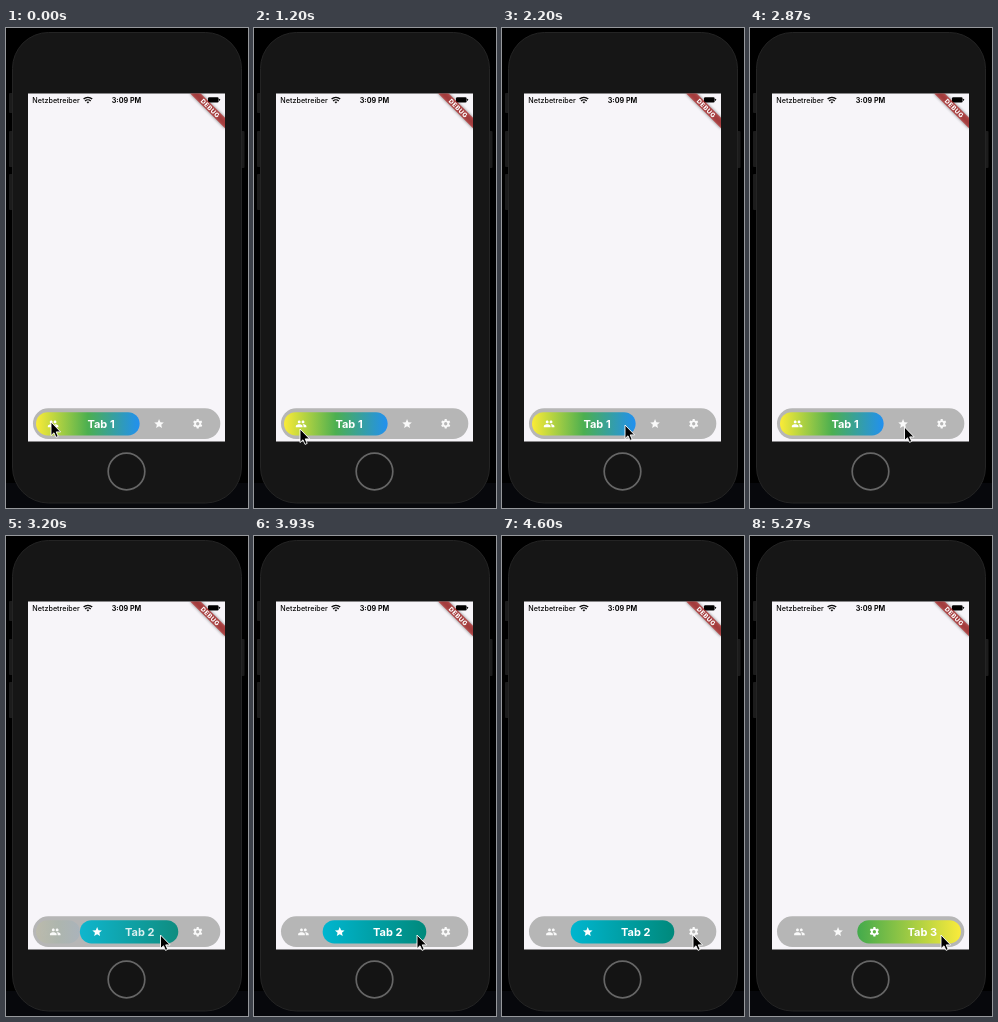
Recreate the animation shown at these times as an HTML page. Size 242 by 480 pixels, loop 5.34 s.

```html
<!DOCTYPE html>
<html lang="en">
<head>
<meta charset="utf-8">
<title>Tab bar</title>
<style>
  html, body { margin: 0; width: 100%; height: 100%; overflow: hidden; background: #000; }
  svg { display: block; width: 242px; height: 480px; }
  text { font-family: Inter, Roboto, sans-serif; text-anchor: middle; }
  .label { font-size: 11px; font-weight: 700; fill: #fff; }
  .status { font-size: 7.2px; fill: #080808; }
  .debug { font-size: 6.3px; font-weight: 800; fill: #fff; letter-spacing: .4px; }
</style>
</head>
<body>
<svg viewBox="0 0 242 480">
  <defs>
    <linearGradient id="g0">
      <stop stop-color="#faeb37"/><stop offset=".5" stop-color="#4caf50"/><stop offset="1" stop-color="#2190f0"/>
    </linearGradient>
    <linearGradient id="g1">
      <stop stop-color="#00b6d0"/><stop offset="1" stop-color="#00897b"/>
    </linearGradient>
    <linearGradient id="g2">
      <stop stop-color="#43aa4c"/><stop offset="1" stop-color="#faeb3b"/>
    </linearGradient>
    <clipPath id="screen"><rect x="22" y="65.5" width="197" height="348"/></clipPath>
    <filter id="soft" x="-30%" y="-80%" width="160%" height="260%"><feGaussianBlur stdDeviation="1.8"/></filter>
  </defs>

  <rect width="242" height="480"/>
  <rect y="455" width="242" height="25" fill="#07080c"/>

  <!-- Phone -->
  <g fill="#1c1c1c">
    <rect x="3" y="65" width="4" height="20" rx="1"/>
    <rect x="3" y="103" width="4" height="36" rx="1"/>
    <rect x="3" y="146" width="4" height="36" rx="1"/>
    <rect x="235" y="103" width="3.5" height="37" rx="1"/>
  </g>
  <rect x="6.5" y="4.5" width="229" height="470.5" rx="36" fill="#161616" stroke="#242424"/>
  <circle cx="120.5" cy="443.5" r="18.3" fill="#141414" stroke="#666" stroke-width="1.7"/>

  <g clip-path="url(#screen)">
    <rect x="22" y="65" width="197" height="349" fill="#f7f5f9"/>
    <text class="status" x="50" y="74.6" font-weight="500">Netzbetreiber</text>
    <g fill="none" stroke="#080808" stroke-width="1.4">
      <path d="M77.6 71.1a6.2 6.2 0 0 1 8.6 0M79.1 73a4 4 0 0 1 5.6 0"/>
      <path d="M80.5 74.1a2 2 0 0 1 2.8 0l-1.4 1.5z" fill="#080808" stroke="none"/>
    </g>
    <text class="status" x="120.5" y="74.6" font-weight="700">3:09 PM</text>
    <rect x="202" y="69.2" width="10.6" height="5.2" rx="1.2"/>
    <rect x="213" y="70.8" width=".9" height="2" rx=".4"/>
    <g transform="translate(219 65.5) rotate(45)">
      <rect x="-24.6" y="17.2" width="49.2" height="7.4" opacity=".5" filter="url(#soft)"/>
      <rect x="-24.6" y="17.2" width="49.2" height="7.4" fill="#b71c1c" fill-opacity=".66"/>
      <text class="debug" x="0" y="23.2">DEBUG</text>
    </g>

    <rect x="27" y="380.3" width="187.3" height="30.6" rx="15.3" fill="#b6b6b6"/>
    <g id="tabs"></g>
  </g>

  <path id="cursor" d="M0 0V13.6L3 10.8 5 15.4 7.2 14.4 5.2 9.9H9.6Z" stroke="#fff" stroke-width=".9" stroke-linejoin="round"/>
</svg>
<script>
const LOOP = 5340, TICK = 200 / 3;
const LEFT = 30, SLIM = 38.65, GROW = 65, MID = 395.8;

const ICONS = [
  "M16 11c1.66 0 2.99-1.34 2.99-3S17.66 5 16 5s-3 1.34-3 3 1.34 3 3 3zM8 11c1.66 0 2.99-1.34 2.99-3S9.66 5 8 5 5 6.34 5 8s1.34 3 3 3zM8 13c-2.33 0-7 1.17-7 3.5V19h14v-2.5C15 14.17 10.33 13 8 13zM16 13c-.29 0-.62.02-.97.05 1.16.84 1.97 1.97 1.97 3.45V19h6v-2.5c0-2.33-4.67-3.5-7-3.5z",
  "M12 17.3 18.2 21l-1.6-7L22 9.2l-7.2-.6L12 2 9.2 8.6 2 9.2 7.5 14l-1.7 7z",
  gearPath()
];

// Tick, x, y of the pointer tip
const POINTER = [
  [0, 45, 394], [7, 45, 394], [14, 46, 401], [26, 46, 401], [30, 82, 392],
  [33, 123, 397], [35, 138, 397], [38, 154, 399], [40, 154.5, 399], [58, 154.5, 399],
  [59, 163, 399], [66, 186, 400], [69, 191, 399], [81, 191, 399]
];

// Tick, selected tab
const SELECTED = [
  [0, 0], [45, 0], [46, .3], [47, .7], [48, .92], [49, 1],
  [71, 1], [72, .55 + 1], [73, 2], [81, 2]
];

function gearPath() {
  const pts = [];
  for (let i = 0; i < 6; i++) {
    for (const [turn, r] of [[-19, 7.4], [-12, 10], [12, 10], [19, 7.4]]) {
      const a = (i * 60 + turn - 90) * Math.PI / 180;
      pts.push((12 + r * Math.cos(a)).toFixed(2) + " " + (12 + r * Math.sin(a)).toFixed(2));
    }
  }
  return "M" + pts.join("L") + "ZM12 8.5a3.5 3.5 0 1 0 0 7a3.5 3.5 0 1 0 0-7Z";
}

function make(tag, attrs, parent) {
  const el = document.createElementNS("http://www.w3.org/2000/svg", tag);
  set(el, attrs);
  return parent.appendChild(el);
}

function set(el, attrs) {
  for (const key in attrs) el.setAttribute(key, attrs[key]);
}

function sample(keys, at) {
  let i = 1;
  while (i < keys.length - 1 && keys[i][0] < at) i++;
  const a = keys[i - 1], b = keys[i];
  const k = (at - a[0]) / (b[0] - a[0]);
  return a.slice(1).map((v, n) => v + (b[n + 1] - v) * k);
}

const root = document.getElementById("tabs");
const cursor = document.getElementById("cursor");
const tabs = ICONS.map((d, i) => {
  const pill = make("rect", { y: 384.2, height: 23.2, rx: 11.6, fill: `url(#g${i})` }, root);
  const icon = make("path", { d, fill: "#fff", "fill-rule": "evenodd" }, root);
  const label = make("text", { class: "label", y: 399.8 }, root);
  label.textContent = "Tab " + (i + 1);
  return { pill, icon, label };
});

function draw(ms) {
  const tick = Math.floor((ms + 7) / TICK);
  const [selected] = sample(SELECTED, tick);
  const [cx, cy] = sample(POINTER, tick);
  let x = LEFT;
  tabs.forEach(({ pill, icon, label }, i) => {
    const on = Math.max(0, 1 - Math.abs(selected - i));
    const width = SLIM + GROW * on;
    const iconX = x + 19.4 - 2.3 * on;
    set(pill, { x, width, opacity: on });
    set(icon, {
      transform: `translate(${iconX} ${MID}) scale(.48) translate(-12 -12)`,
      opacity: .92 + .08 * on
    });
    set(label, { x: x + width - 38.6, opacity: on * on });
    x += width;
  });
  set(cursor, { transform: `translate(${cx} ${cy})` });
}

const start = performance.now();
function frame() {
  draw((performance.now() - start) % LOOP);
  requestAnimationFrame(frame);
}
frame();
</script>
</body>
</html>
```
